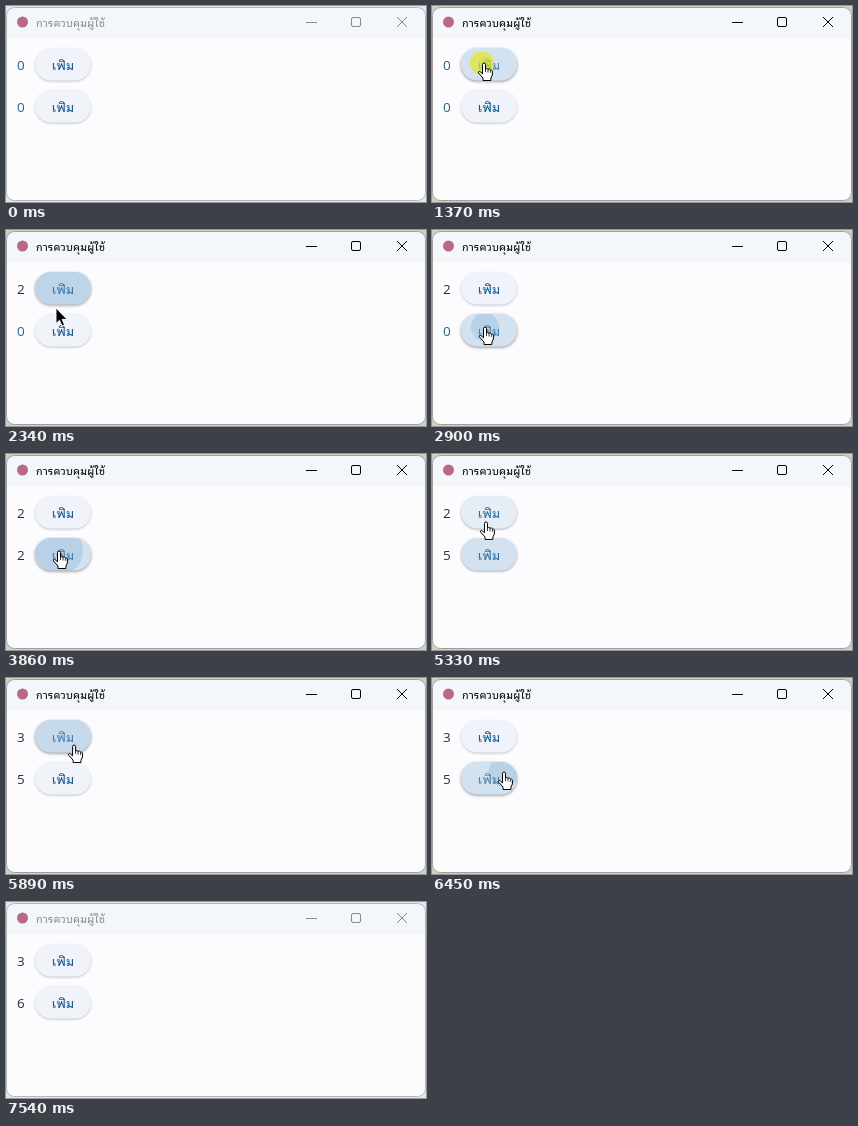
Animation of 420 by 196 pixels, one loop 7.66 s. Source, as an HTML page:

```html
<!DOCTYPE html>
<html lang="th">
<head>
<meta charset="utf-8">
<style>
html, body { margin: 0; width: 420px; height: 196px; overflow: hidden; }
svg { display: block; }
text { font-family: 'Noto Sans Thai Looped', 'Noto Looped Thai', 'Noto Sans Thai', 'Noto Sans', sans-serif; }
.count { font: 13.5px 'Open Sans', 'Noto Sans', sans-serif; }
</style>
</head>
<body>
<svg id="stage" width="420" height="196" viewBox="0 0 420 196">
  <clipPath id="frame"><rect x=".5" y="1.5" width="419" height="193" rx="8"/></clipPath>
  <clipPath id="pill"><rect x="29" y="42" width="56" height="32.5" rx="16.25"/></clipPath>
  <rect id="back" width="420" height="196"/>
  <g clip-path="url(#frame)">
    <rect width="420" height="196" fill="#fcfcff"/>
    <rect width="420" height="32" fill="#f3f6fb"/>
  </g>
  <rect id="edge" x=".5" y="1.5" width="419" height="193" rx="8" fill="none"/>
  <circle cx="16.5" cy="16" r="5.5" fill="#b8688a"/>
  <text id="title" x="30" y="21" font-size="11">การควบคุมผู้ใช้</text>
  <g id="controls" fill="none">
    <path d="M300 16.5h11M391 11l10 10M401 11l-10 10"/>
    <rect x="345.5" y="11.5" width="9" height="9" rx="1.5"/>
  </g>
  <g id="rows"></g>
  <circle id="glow" cx="50" cy="57" r="12" fill="#e8e800" opacity=".6"/>
  <g id="cursor">
    <path id="arrow" d="M0 0V15.5l3.5-3.3 2.4 5.6 2.6-1.1-2.4-5.4H11z" fill="#000" stroke="#fff" stroke-width=".9"/>
    <g id="hand" stroke="#000" stroke-linejoin="round">
      <path d="M-1.5 1.5a1.5 1.5 0 0 1 3 0V6l1.2-.5 1.3.8 1.2-.4 1.2.9 1 .1 1 1.2V12l-1.5 3v2.5H-1V15l-4.5-5c-.6-1.2.6-2 1.7-1.2l2.3 2z" fill="#fff"/>
      <path d="M1.5 6v3M4 6.5v3M6.4 7.3v2.5" fill="none" stroke-width=".8"/>
    </g>
  </g>
</svg>
<script>
const LOOP = 7660, FOCUS = 1370, BLUR = 7540;
const $ = id => document.getElementById(id);
const clamp = v => Math.max(0, Math.min(1, v));
const show = (el, on) => el.setAttribute('visibility', on ? 'visible' : 'hidden');

// Cursor hot spot: time, x, y
const path = [
  [130, 296, 184], [340, 155, 160], [550, 83, 136], [840, 52, 57],
  [2130, 52, 57], [2340, 50, 78], [2630, 53, 97],
  [4980, 53, 97], [5250, 53, 77], [5330, 54, 68], [5470, 52, 58],
  [5750, 54, 58], [6030, 82, 76], [6240, 74, 92], [6380, 72, 94],
  [6560, 72, 94], [6800, 118, 143]
];

// hover: [enter, leave]; clicks: [press, ripple length]
const rows = [
  { y: 0, hover: [[700, 2300], [5270, 5900]], clicks: [[1370, 260], [2060, 560], [5540, 450]] },
  { y: 42, hover: [[2480, 5230], [6130, 6700]],
    clicks: [[2830, 270], [3720, 420], [4140, 400], [4490, 400], [4900, 560], [6370, 480]] }
];

for (const row of rows) {
  const g = document.createElementNS('http://www.w3.org/2000/svg', 'g');
  g.setAttribute('transform', `translate(0 ${row.y})`);
  g.innerHTML = `<text class="count" x="11" y="64"></text>
    <rect x="29" y="42" width="56" height="32.5" rx="16.25" fill="#f0f4fa"/>
    <g clip-path="url(#pill)" fill="#0061a4">
      <rect x="29" y="42" width="56" height="33"/><circle/>
    </g>
    <text x="57" y="64" font-size="13" text-anchor="middle" fill="#0f5a92">เพิ่ม</text>`;
  $('rows').append(g);
  [row.count, row.label] = g.querySelectorAll('text');
  [row.base, row.tint] = g.querySelectorAll('rect');
  row.ripple = g.querySelector('circle');
}

function cursorAt(t) {
  let i = 1;
  while (i < path.length - 1 && path[i][0] < t) i++;
  const [t0, x0, y0] = path[i - 1], [t1, x1, y1] = path[i];
  const k = clamp((t - t0) / (t1 - t0));
  return [x0 + (x1 - x0) * k, y0 + (y1 - y0) * k];
}

function drawRow(row, t) {
  const hover = Math.max(...row.hover.map(([a, b]) =>
    Math.min(clamp((t - a) / 150), clamp(1 - (t - b) / 200))));
  row.tint.setAttribute('opacity', hover * .12);
  row.label.setAttribute('opacity', 1 - hover * .3);
  row.base.style.filter =
    `drop-shadow(0 1px ${1 + hover * .6}px rgba(0,0,0,${.22 + hover * .2}))`;

  const count = row.clicks.filter(c => t >= c[0] + 100).length;
  row.count.textContent = count;
  row.count.setAttribute('fill', count ? '#26303c' : '#2f6288');

  const click = row.clicks.filter(c => t >= c[0]).pop();
  show(row.ripple, click);
  if (!click) return;
  const [press, length] = click, age = t - press;
  const [x, y] = cursorAt(press);
  row.ripple.setAttribute('cx', x);
  row.ripple.setAttribute('cy', y - row.y);
  row.ripple.setAttribute('r', 6 + age * .1 + age * age * .0002);
  row.ripple.setAttribute('opacity', .13 * clamp((length - age) / (length * .45)));
}

function draw(t) {
  const active = t >= FOCUS && t < BLUR;
  $('back').setAttribute('fill', active ? '#cfcfc2' : '#e6e6e6');
  $('edge').setAttribute('stroke', active ? '#a0a09a' : '#b4b6b8');
  $('title').setAttribute('fill', active ? '#000' : '#8c8c8c');
  $('controls').setAttribute('stroke', active ? '#000' : '#8a8a8a');
  rows.forEach(row => drawRow(row, t));

  const [x, y] = cursorAt(t), shown = t >= 130 && t < BLUR;
  const over = x > 29 && x < 85 && rows.some(r => y > 42 + r.y && y < 75 + r.y);
  $('cursor').setAttribute('transform', `translate(${x} ${y})`);
  show($('arrow'), shown && !over);
  show($('hand'), shown && over);
  show($('glow'), t >= FOCUS && t < 1540);
}

const start = performance.now();
function tick() {
  draw((performance.now() - start) % LOOP);
  requestAnimationFrame(tick);
}
tick();
</script>
</body>
</html>
```
